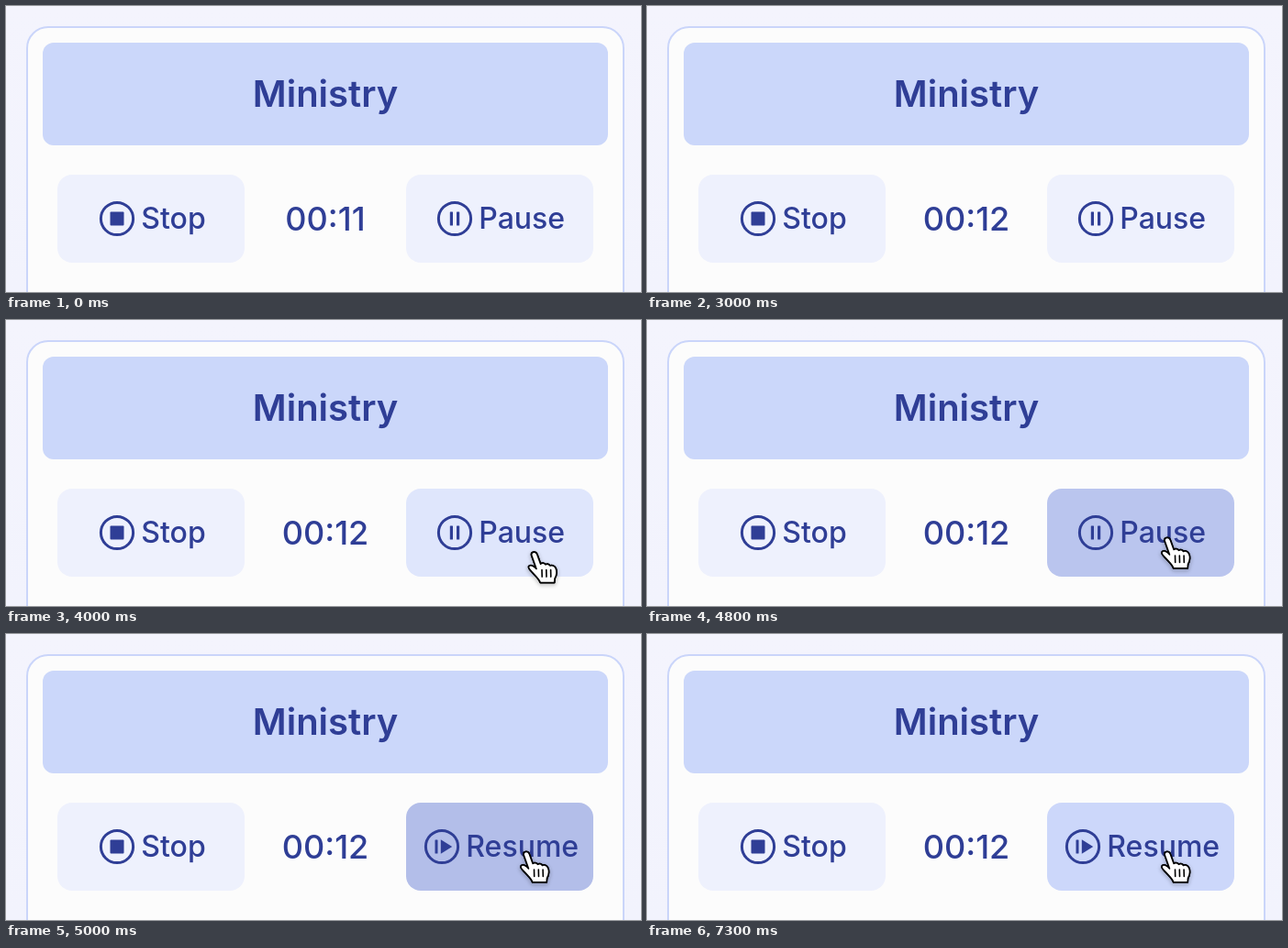
Recreate the animation shown at these times as an HTML page with a canvas. Size 692 px wide and 312 px high, loop 8000 ms.

```html
<!DOCTYPE html>
<html lang="en">
<head>
<meta charset="utf-8">
<title>Ministry timer</title>
<style>
  html, body { margin: 0; width: 100%; height: 100%; overflow: hidden; background: #f4f4fd; }
  canvas { display: block; width: 692px; height: 312px; font-optical-sizing: none; }
</style>
</head>
<body>
<canvas id="stage" width="692" height="312"></canvas>
<script>
const ctx = document.getElementById('stage').getContext('2d');
const LOOP = 8000;
const STEP = 100;
const INK = '#2f3e96';
const IDLE = [238, 241, 253];
const HOVER = [204, 215, 250];
const PRESSED = [174, 185, 230];
const HAND = new Path2D(
  'M-3.4 2.2 C-3.8 -1.6 1.4 -2.2 2.8 1.5 L6.6 12 C8 10.6 11 11 12 12.8 ' +
  'C13.5 11.6 16 12.2 17 14 C18.5 13 21.6 13.6 23 16.4 C25 20.4 24 24.4 22 28 ' +
  'L21.6 32.3 L6.2 32.3 C5.6 29 1 25 -2 21.6 C-5 18.6 -7.4 16.6 -6.3 14.6 ' +
  'C-5 12.6 -1 13.6 2 17.4 Z');

const clamp = v => Math.min(1, Math.max(0, v));
const progress = (t, from, to) => clamp((t - from) / (to - from));
const mix = (a, b, p) => a + (b - a) * p;
const rgb = c => `rgb(${c.map(Math.round).join(',')})`;
const mixColor = (a, b, p) => a.map((v, i) => mix(v, b[i], p));

function box(x, y, w, h, r, fill) {
  ctx.beginPath();
  ctx.roundRect(x, y, w, h, r);
  ctx.fillStyle = fill;
  ctx.fill();
}

function label(text, x, y, size, weight, align = 'left') {
  ctx.font = `${weight} ${size}px Inter, sans-serif`;
  ctx.textAlign = align;
  ctx.fillStyle = INK;
  ctx.fillText(text, x, y);
}

const icons = {
  stop(x, y) {
    box(x - 7.5, y - 7.5, 15, 15, 1, INK);
  },
  pause(x, y) {
    box(x - 5.2, y - 7.5, 3.2, 15, 0.5, INK);
    box(x + 2, y - 7.5, 3.2, 15, 0.5, INK);
  },
  resume(x, y) {
    box(x - 7.5, y - 7.5, 3, 15, 0.5, INK);
    ctx.beginPath();
    ctx.moveTo(x - 1.2, y - 7.8);
    ctx.lineTo(x + 11.2, y);
    ctx.lineTo(x - 1.2, y + 7.8);
    ctx.fill();
  }
};

function button(x, fill, icon, text, iconX) {
  box(x, 184, 204, 96, 16, fill);
  ctx.beginPath();
  ctx.arc(iconX, 232, 17.6, 0, Math.PI * 2);
  ctx.strokeStyle = INK;
  ctx.lineWidth = 3;
  ctx.stroke();
  icons[icon](iconX, 232);
  label(text, iconX + 26.3, 243, 32, 500);
}

function drawCard() {
  const sky = ctx.createLinearGradient(0, 0, 0, 312);
  sky.addColorStop(0, '#f4f4fd');
  sky.addColorStop(1, '#f2f3fd');
  ctx.fillStyle = sky;
  ctx.fillRect(0, 0, 692, 312);
  box(23, 23, 650, 340, 23, '#fcfcfc');
  ctx.strokeStyle = '#cad5fa';
  ctx.lineWidth = 2;
  ctx.stroke();
  box(40, 40, 616, 112, 12, '#cbd7fa');
  label('Ministry', 348, 110, 40, 600, 'center');
}

function actionColor(t) {
  if (t < 4800) return mixColor(IDLE, HOVER, progress(t, 3850, 4200));
  if (t < 4900) return mixColor(HOVER, PRESSED, 0.6);
  return mixColor(PRESSED, HOVER, progress(t, 4950, 5250));
}

function drawCursor(t) {
  if (t < 3800) return;
  const left = (1 - progress(t, 3700, 4300)) ** 2;
  ctx.save();
  ctx.translate(mix(567.5, 601.5, left), mix(238.5, 301, left));
  ctx.lineJoin = ctx.lineCap = 'round';
  ctx.strokeStyle = '#000';
  ctx.shadowColor = 'rgba(0,0,0,.4)';
  ctx.shadowBlur = 4;
  ctx.shadowOffsetY = 1.5;
  ctx.lineWidth = 2;
  ctx.stroke(HAND);
  ctx.shadowColor = 'transparent';
  ctx.fillStyle = '#fff';
  ctx.fill(HAND);
  ctx.lineWidth = 1.6;
  ctx.stroke(HAND);
  for (const x of [8, 12.8, 17.6]) {
    ctx.beginPath();
    ctx.moveTo(x, 18.5);
    ctx.lineTo(x + 0.2, 26);
    ctx.stroke();
  }
  ctx.restore();
}

function render(t) {
  drawCard();
  button(56, rgb(IDLE), 'stop', 'Stop', 121);
  const action = rgb(actionColor(t));
  if (t < 4900) button(436, action, 'pause', 'Pause', 489);
  else button(436, action, 'resume', 'Resume', 475);
  // The paused clock blinks once a second.
  if (t < 6000 || t >= 7000) {
    label(t < 2100 ? '00:11' : '00:12', 348, 245, 36, 500, 'center');
  }
  drawCursor(t);
}

const start = performance.now();
function tick() {
  const t = (performance.now() - start) % LOOP;
  render(Math.floor(t / STEP) * STEP);
  requestAnimationFrame(tick);
}
tick();
</script>
</body>
</html>
```
